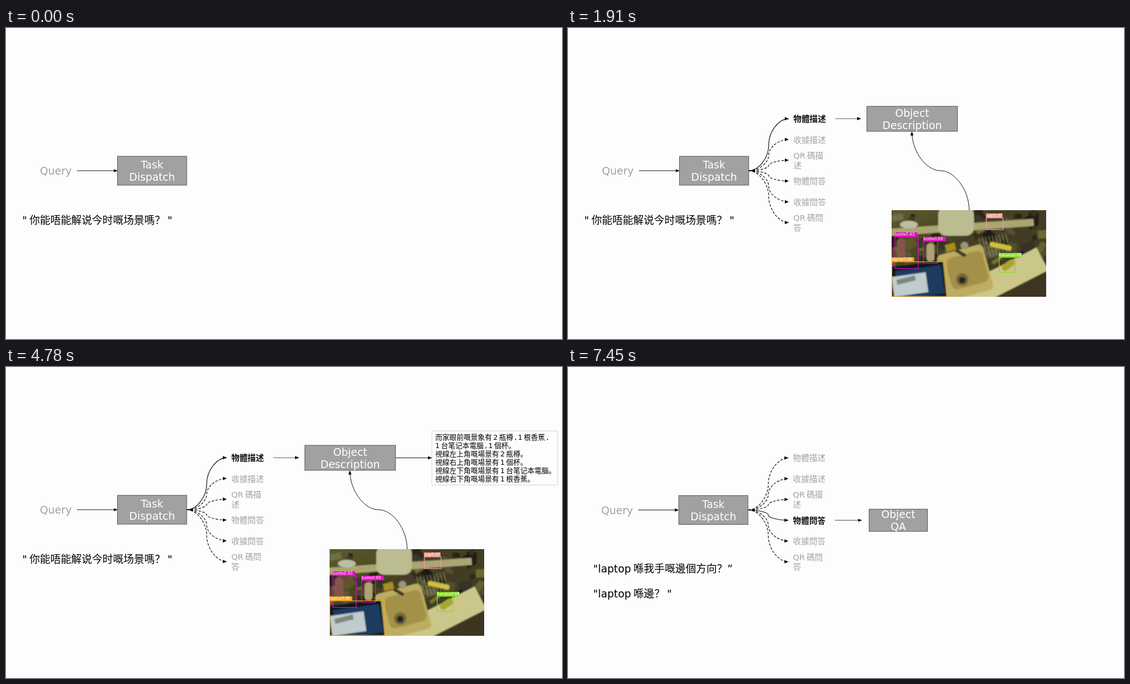
An HTML page that plays this animation: 1000 px wide and 560 px high, repeating every 8000 ms.

```html
<!DOCTYPE html>
<html lang="zh">
<head>
<meta charset="utf-8">
<style>
  html, body { margin: 0; height: 100%; overflow: hidden; background: #fdfdfd; }
  svg { display: block; width: 100vw; height: 100vh; font: 18.8px 'DejaVu Sans', 'Noto Sans CJK SC', 'Noto Sans CJK JP', sans-serif; word-spacing: -.094em; }
  text { white-space: pre; }
  .line { fill: none; stroke: #111; }
  .box { fill: #a1a1a0; stroke: #555; }
  .option { font-size: 14.65px; }
  .tag { font: 7.2px Inter, sans-serif; fill: #fff; }
</style>
</head>
<body>
<svg id="stage" viewBox="0 0 1000 560">
  <defs>
    <marker id="head" viewBox="0 0 7 6" refX="7" refY="3" markerWidth="7" markerHeight="6" markerUnits="userSpaceOnUse" orient="auto">
      <path d="M0 0L7 3L0 6z"/>
    </marker>
    <clipPath id="photoClip"><rect x="582" y="328" width="278" height="156"/></clipPath>
    <linearGradient id="wall" x2="1" y2="1">
      <stop stop-color="#5f5c30"/><stop offset=".4" stop-color="#454120"/><stop offset="1" stop-color="#3a3324"/>
    </linearGradient>
    <filter id="soft"><feGaussianBlur stdDeviation=".9"/></filter>
  </defs>
</svg>
<script>
const LOOP = 8000, SWITCH = 5550;
const GREY = 'fill="#a2a2a2"';
const stage = document.getElementById('stage');
const layers = [];

const repeat = (count, make) => Array.from({ length: count }, (_, i) => make(i)).join('');
const text = (x, y, str, attrs = '') => `<text x="${x}" y="${y}" ${attrs}>${str}</text>`;
const arrow = (d, width = 1.2, attrs = '') =>
  `<path class="line" d="${d}" stroke-width="${width}" marker-end="url(#head)" ${attrs}/>`;
const ellipse = (fill, x, y, rx, ry = rx) => `<ellipse fill="${fill}" cx="${x}" cy="${y}" rx="${rx}" ry="${ry}"/>`;
const tile = (fill, cx, cy, w, h, angle = 0, round = 0) =>
  `<rect x="${-w / 2}" y="${-h / 2}" width="${w}" height="${h}" rx="${round}" fill="${fill}" transform="translate(${cx} ${cy}) rotate(${angle})"/>`;

function box(x, y, w, h, lines, baseline) {
  return `<rect class="box" x="${x}" y="${y}" width="${w}" height="${h}"/>` +
    lines.map((s, i) => text(x + w / 2, baseline + i * 22.4, s, 'fill="#fff" text-anchor="middle"')).join('');
}

// A layer fades in from start to full; with leave = [from, to] it fades out again.
function layer(markup, end, start, full = start, leave) {
  const g = document.createElementNS('http://www.w3.org/2000/svg', 'g');
  g.innerHTML = markup;
  stage.append(g);
  layers.push({ g, start, full, end, leave });
}

const ramp = (t, a, b) => t < a ? 0 : t >= b ? 1 : (t - a) / (b - a);

// The two scenes share one layout, shifted by (dx, dy).
const shift = (dx, dy, markup) => `<g transform="translate(${dx} ${dy})">${markup}</g>`;

const queryBlock = text(61, 264, 'Query', GREY) + arrow('M127.5 257H200.5') +
  box(200.5, 231, 124.5, 52, ['Task', 'Dispatch'], 253);

const options = ['物體描述', '收據描述', 'QR 碼描|述', '物體問答', '收據問答', 'QR 碼問|答'];

function option(i, chosen) {
  const endY = 163.3 + i * 37.4, half = (endY - 257) / 2;
  const curve = `M325 257c18 0 36 ${half / 2} 36 ${half}s18 ${half} 36 ${half}`;
  const rows = options[i].split('|');
  const style = chosen ? 'font-weight="700" fill="#111"' : GREY;
  return arrow(curve, 1.2, chosen ? '' : 'stroke-dasharray="4.5 2.6"') +
    rows.map((s, r) => text(405.3, endY + 5.8 + (r - (rows.length - 1) / 2) * 17.8, s, `class="option" ${style}`)).join('');
}

function fan(chosen, end, fade, highlight, dx, dy) {
  const others = options.map((_, i) => i === chosen ? '' : option(i, false)).join('');
  layer(shift(dx, dy, others + '<path d="M329 257.3l7-3v6z"/>'), end, ...fade);
  layer(shift(dx, dy, option(chosen, false)), end, ...fade, highlight);
  layer(shift(dx, dy, option(chosen, true)), end, ...highlight);
}

function detection(color, x, y, w, h, label) {
  return `<rect x="${x}" y="${y}" width="${w}" height="${h}" fill="none" stroke="${color}" stroke-width="1.2"/>
    <rect x="${x - .6}" y="${y - 8}" width="${label.length * 3.7}" height="8" fill="${color}"/>` +
    text(x, y - 1.7, label, 'class="tag"');
}

let seed = 7;
const random = () => (seed = seed * 16807 % 2147483647) / 2147483647;

// Dim kitchen clutter behind the sink.
const clutter = repeat(70, () => tile(
  `hsl(${35 + random() * 25} ${15 + random() * 25}% ${8 + random() * 28}%)`,
  582 + random() * 278, 332 + random() * 90, 6 + random() * 18, 6 + random() * 18, random() * 90));

const rack = repeat(9, i => tile('#a19b70', 743 + i * 6, 395 - i, .8, 36, -14));

const photo = '<g clip-path="url(#photoClip)"><g filter="url(#soft)">' +
  tile('url(#wall)', 721, 406, 290, 170) + clutter +
  tile('#aaa571', 708, 359, 260, 13, -4) +
  ellipse('#bcbea0', 613, 354, 16, 7) +
  tile('#bbbd91', 698, 348, 64, 52, 0, 14) +
  tile('#cbc78a', 782, 452, 160, 46, -27) +
  tile('#bcad60', 714, 440, 86, 84, -15, 8) + tile('#a39148', 718, 436, 68, 58, -15, 10) +
  ellipse('#73683d', 709, 453, 11) + ellipse('#29251b', 709, 454, 6) +
  ellipse('#99957a', 713, 392, 7) + tile('#403b28', 706, 405, 22, 6, 30, 3) +
  tile('#a98d22', 688, 395, 18, 13, -15) + rack +
  tile('#cfbf3b', 778, 393, 40, 9, 12, 4) + tile('#a6a72d', 792, 427, 26, 12, -35, 6) +
  tile('#82574b', 599, 399, 16, 40, 0, 6) + tile('#b0a274', 652, 404, 14, 32, 0, 5) +
  tile('#0d151d', 628, 458, 100, 66, -6) + tile('#1c3a5f', 633, 458, 84, 52, -8) +
  tile('#c0cccc', 615, 462, 62, 36, -8) + tile('#7d8683', 608, 454, 34, 9, -14) + '</g>' +
  detection('#e20fc0', 588, 376, 42, 57, 'bottle 0.43') +
  detection('#e20fc0', 639.5, 384, 25, 40, 'bottle 0.69') +
  detection('#f79a9b', 752.5, 342, 30, 21, 'cup 0.47') +
  detection('#86dc20', 775.5, 413, 29, 27, 'banana 0.68') +
  detection('#f4a321', 582.5, 421, 99, 62, 'laptop 0.66') + '</g>';

const answer = [
  '而家眼前嘅景象有 2 瓶樽 , 1 根香蕉 ,',
  '1 台笔记本電腦 , 1 個杯。',
  '視線左上角嘅場景有 2 瓶樽。',
  '視線右上角嘅場景有 1 個杯。',
  '視線左下角嘅場景有 1 台笔记本電腦。',
  '視線右下角嘅場景有 1 根香蕉。'
].map((s, i) => text(772, 131.2 + i * 14.95, s, 'font-size="12.75"')).join('');

// Scene one: description
layer(queryBlock + text(29.3, 353, '" 你能唔能解说今时嘅场景嗎？ "'), SWITCH, 0);
fan(0, SWITCH, [30, 170], [250, 310], 0, 0);
layer(arrow('M480.5 163.3H527', .8, 'style="stroke:#334"') +
  box(537.5, 141, 163, 45, ['Object', 'Description'], 160), SWITCH, 1190);
layer(photo + arrow('M721.5 328C721.5 292.5 696 257 670 257S618.5 222 618.5 186.5', 1), SWITCH, 1910);
layer('<rect x="766" y="115" width="226" height="97.5" fill="#fdfdfd" stroke="#d2d2d2"/>' +
  arrow('M701 163.6H766', 1) + answer, SWITCH, 2800, 2910);

// Scene two: question answering
layer(shift(-1.3, .5, queryBlock) +
  text(45.3, 369.8, '"laptop 喺我手嘅邊個方向？”') +
  text(45.3, 414.8, '"laptop 喺邊？ "'), LOOP, SWITCH);
fan(3, LOOP, [5650, 5790], [6110, 6110], -.7, .4);
layer(arrow('M480 276H528.5', .8) + box(541.5, 256, 105, 40, ['Object', 'QA'], 272), LOOP, 7160);

function draw() {
  const t = performance.now() % LOOP;
  for (const { g, start, full, end, leave } of layers) {
    const gone = leave ? ramp(t, ...leave) : 0;
    g.style.opacity = t < end ? ramp(t, start, full) * (1 - gone) : 0;
  }
  requestAnimationFrame(draw);
}
draw();
</script>
</body>
</html>
```
